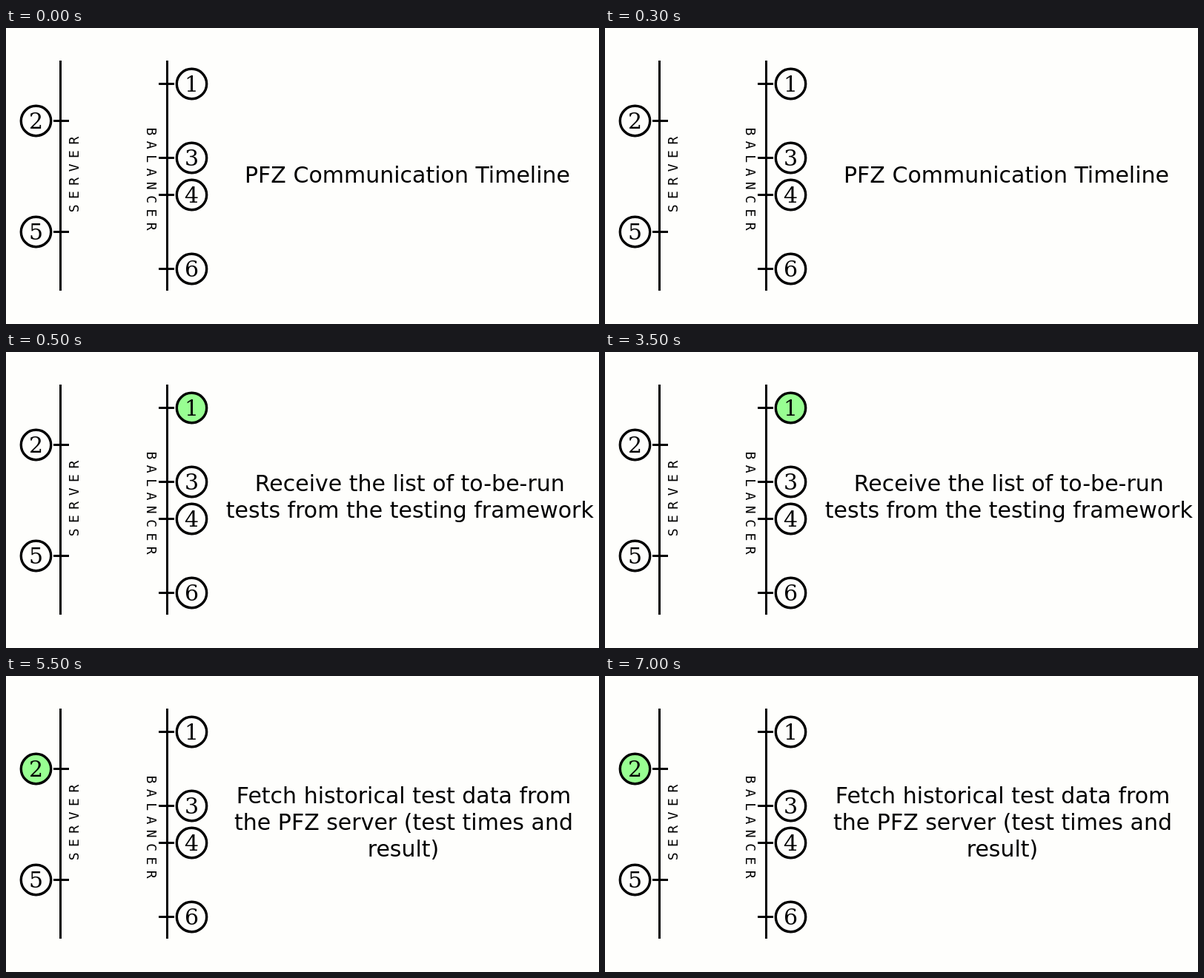
An HTML page for the animation above (8000 ms loop, 800 by 400 pixels).

```html
<!DOCTYPE html>
<html lang="en">
<head>
<meta charset="utf-8">
<title>Communication Timeline</title>
<style>
html, body { margin: 0; width: 100%; height: 100%; overflow: hidden; background: #fefefc; }
svg { display: block; width: 800px; height: 400px; }
text { fill: #000; font-kerning: none; }
.line { stroke: #000; stroke-width: 3; fill: none; }
.node { stroke: #000; stroke-width: 3.4; }
.digit { font: 30px "DejaVu Serif", serif; text-anchor: middle; }
.label { font: 18px "DejaVu Sans Mono", monospace; letter-spacing: 7.5px; }
.caption { font: 30px "DejaVu Sans", sans-serif; text-anchor: middle; }
</style>
</head>
<body>
<svg id="stage" viewBox="0 0 800 400">
  <path class="line" d="M73.5 44V355M217.5 44V355"/>
  <text class="label" transform="translate(97.5 249.3) rotate(-90)">SERVER</text>
  <text class="label" transform="translate(189.5 134.5) rotate(90)">BALANCER</text>
  <g id="nodes"></g>
  <g id="captions"></g>
</svg>
<script>
const LOOP = 8000;
const GREEN = '#98fe92';
const PLAIN = '#fefefc';

// Each line of a caption: [centre x, baseline y, text]
const scenes = [
  { start: 0, active: 0, lines: [[541.5, 209, 'PFZ Communication Timeline']] },
  { start: 500, active: 1, lines: [
    [544.8, 188, 'Receive the list of to-be-run'],
    [544.8, 224, 'tests from the testing framework']] },
  { start: 5500, active: 2, lines: [
    [536.5, 172, 'Fetch historical test data from'],
    [536.5, 208, 'the PFZ server (test times and'],
    [536, 244, 'result)']] }
];

// Timeline events from top to bottom, 50px per step
const events = [
  { side: 'balancer', step: 0 },
  { side: 'server', step: 1 },
  { side: 'balancer', step: 2 },
  { side: 'balancer', step: 3 },
  { side: 'server', step: 4 },
  { side: 'balancer', step: 5 }
];

function add(parent, tag, attrs, text) {
  const el = document.createElementNS(parent.namespaceURI, tag);
  for (const key in attrs) el.setAttribute(key, attrs[key]);
  if (text) el.textContent = text;
  return parent.appendChild(el);
}

const nodes = document.getElementById('nodes');
const circles = events.map(({ side, step }, i) => {
  const server = side === 'server';
  const cx = server ? 40.5 : 250.5;
  const cy = 75.5 + step * 50;
  add(nodes, 'path', { class: 'line', d: `M${server ? 64 : 206} ${cy}h21` });
  const circle = add(nodes, 'circle', { class: 'node', cx, cy, r: 20.2, fill: PLAIN });
  add(nodes, 'text', { class: 'digit', x: cx, y: cy + 10.5 }, String(i + 1));
  return circle;
});

const captions = document.getElementById('captions');
const groups = scenes.map(({ lines }) => {
  const group = add(captions, 'g', { visibility: 'hidden' });
  for (const [x, y, text] of lines) add(group, 'text', { class: 'caption', x, y }, text);
  return group;
});

function render(time) {
  const current = scenes.findLastIndex(scene => time >= scene.start);
  groups.forEach((group, i) =>
    group.setAttribute('visibility', i === current ? 'visible' : 'hidden'));
  circles.forEach((circle, i) =>
    circle.setAttribute('fill', i + 1 === scenes[current].active ? GREEN : PLAIN));
}

const origin = performance.now();
function tick() {
  render((performance.now() - origin) % LOOP);
  requestAnimationFrame(tick);
}
tick();
</script>
</body>
</html>
```
